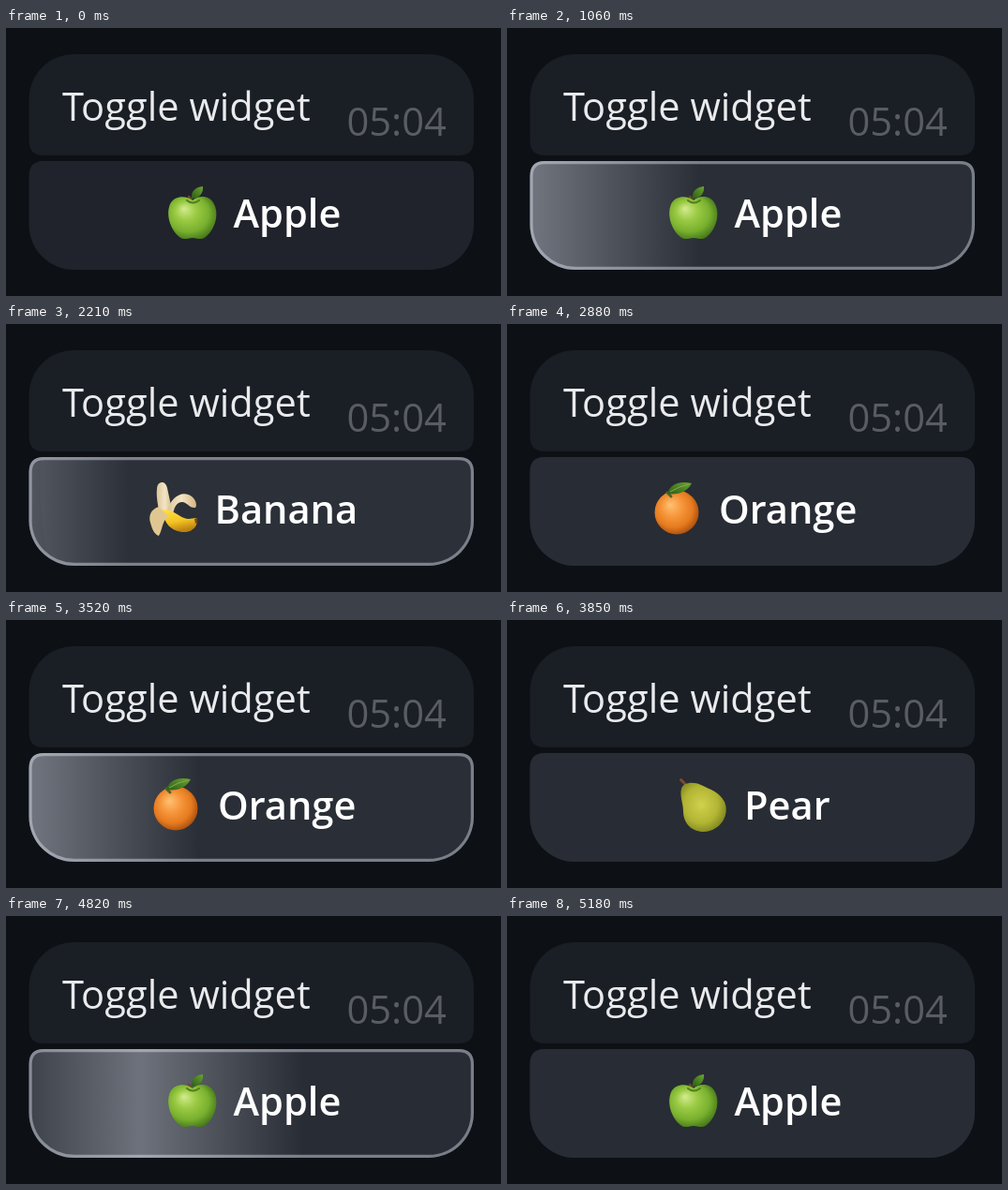
These frames come from a looping animation (528 by 286 pixels, 5210 ms). An HTML page:

```html
<!DOCTYPE html>
<html lang="en">
<head>
<meta charset="utf-8">
<title>Toggle widget</title>
<style>
  html, body { margin: 0; width: 100%; height: 100%; overflow: hidden; background: #0d1015; }
  svg { display: block; width: 528px; height: 286px; }
  text { font: 400 41.6px "Open Sans", "Noto Sans", sans-serif; fill: #e9eaec; }
  .time { fill: #595d63; }
  .label text { font-weight: 600; fill: #fff; }
  .label { display: none; }
  .label.on { display: inline; }
</style>
</head>
<body>
<svg viewBox="0 0 528 286">
  <defs>
    <path id="shape" d="M40 142H483Q499 142 499 158V210A48 48 0 0 1 451 258H73A48 48 0 0 1 24.500 210V158Q24.500 142 40 142Z"/>
    <clipPath id="clip"><use href="#shape"/></clipPath>
    <linearGradient id="shine">
      <stop offset="0" stop-color="#e8eefa" stop-opacity="0"/>
      <stop offset=".5" stop-color="#e8eefa" stop-opacity=".36"/>
      <stop offset="1" stop-color="#e8eefa" stop-opacity="0"/>
    </linearGradient>
    <radialGradient id="appleSkin" cx=".45" cy=".45" r=".62" fx=".32" fy=".28">
      <stop offset="0" stop-color="#d3ec90"/>
      <stop offset=".35" stop-color="#9ccb45"/>
      <stop offset=".7" stop-color="#78b02e"/>
      <stop offset="1" stop-color="#3f7018"/>
    </radialGradient>
    <radialGradient id="orangeSkin" cx=".46" cy=".45" r=".6" fx=".35" fy=".32">
      <stop offset="0" stop-color="#ffc274"/>
      <stop offset=".4" stop-color="#f6953a"/>
      <stop offset=".72" stop-color="#e57a1e"/>
      <stop offset="1" stop-color="#a0470d"/>
    </radialGradient>
    <radialGradient id="pearSkin" cx=".45" cy=".45" r=".62">
      <stop offset="0" stop-color="#d0d14c"/>
      <stop offset=".6" stop-color="#b2b534"/>
      <stop offset="1" stop-color="#787e1d"/>
    </radialGradient>
    <linearGradient id="bananaSkin" x1="0" y1="0" x2=".3" y2="1">
      <stop offset="0" stop-color="#ffe14a"/>
      <stop offset=".6" stop-color="#f3c324"/>
      <stop offset="1" stop-color="#bd8410"/>
    </linearGradient>
    <linearGradient id="flesh">
      <stop offset="0" stop-color="#dcc59a"/>
      <stop offset=".5" stop-color="#f3e5c4"/>
      <stop offset="1" stop-color="#d2b681"/>
    </linearGradient>
    <linearGradient id="leaf" x1="0" y1="1" x2="1" y2="0">
      <stop offset="0" stop-color="#2c5c18"/>
      <stop offset="1" stop-color="#6aa52f"/>
    </linearGradient>
  </defs>

  <path fill="#1a1e25" d="M72 28H451A48 48 0 0 1 499 76V120Q499 136 483 136H40Q24.500 136 24.500 120V76A48 48 0 0 1 72 28Z"/>
  <text x="60" y="98.500">Toggle widget</text>
  <text class="time" x="363.500" y="115">05:04</text>

  <use href="#shape" fill="#20232b"/>
  <use id="hover" href="#shape" fill="#282c34"/>
  <g clip-path="url(#clip)">
    <circle id="ripple" cx="465" cy="170" r="0" fill="#fff"/>
    <g id="loading">
      <rect id="glare" y="142" width="350" height="117" fill="url(#shine)"/>
      <use href="#shape" fill="none" stroke="#e8eefa" stroke-opacity=".42" stroke-width="6.400"/>
    </g>
  </g>

  <g class="label">
    <path fill="none" stroke="#6b4a22" stroke-width="2.500" stroke-linecap="round" d="M199 187Q198 183 195 180"/>
    <path fill="url(#appleSkin)" d="M199 184C205 178 218 178 222 188C228 200 222 216 213 223C208 227 203 224 199 224C195 224 190 227 185 223C176 216 170 200 175 188C180 178 193 179 199 184Z"/>
    <path fill="none" stroke="#4f7d20" stroke-width="2" stroke-linecap="round" d="M193 184Q199 189 206 184"/>
    <path fill="url(#leaf)" d="M198 182C197 174 202 170 210 169C211 176 206 182 198 182Z"/>
    <text x="242.500" y="213">Apple</text>
  </g>

  <g class="label">
    <path fill="url(#flesh)" d="M161 176C161 168 170 166 172 175L178 203L164 205C162 192 160 184 161 176Z"/>
    <path fill="url(#flesh)" d="M172 199C175 186 188 176 198 184C203 188 204 194 202 196C196 197 193 190 188 190C182 190 179 196 178 204Z"/>
    <path fill="url(#bananaSkin)" d="M167 198C176 197 183 204 190 207C195 209 199 207 203 207C206 214 200 222 190 222C177 222 168 213 167 198Z"/>
    <path fill="#e0c791" d="M163 195C154 198 152 205 154 212C156 220 159 225 163 226C167 220 166 211 173 205Z"/>
    <path fill="#6a4a1c" d="M201 208L204 207L204.500 212L202 213Z"/>
    <text x="222.500" y="213">Banana</text>
  </g>

  <g class="label">
    <circle cx="181" cy="201" r="23.500" fill="url(#orangeSkin)"/>
    <path fill="none" stroke="#4d6628" stroke-width="3" stroke-linecap="round" d="M175 184L171 180"/>
    <path fill="url(#leaf)" d="M171 181C174 171 184 167 197 170C192 179 183 183 171 181Z"/>
    <path fill="none" stroke="#86ab54" d="M174 179Q184 173 194 171"/>
    <text x="226" y="213">Orange</text>
  </g>

  <g class="label">
    <path fill="none" stroke="#7c4a2c" stroke-width="3" stroke-linecap="round" d="M191 178Q189 173 185.500 170.500"/>
    <path fill="url(#pearSkin)" d="M186 180C188 173 199 172 207 176C217 181 226 183 232 194C238 208 228 225 210 226C196 226 188 216 188 204C188 196 184 188 186 180Z"/>
    <text x="253" y="213">Pear</text>
  </g>
</svg>
<script>
  const LOOP = 5210;
  const PRESSES = [750, 1980, 3210, 4390];
  const RELEASE = 150, SWAP = 430, DONE = 520; // after each press
  const $ = id => document.getElementById(id);
  const labels = [...document.querySelectorAll('.label')];
  const clamp = x => Math.min(1, Math.max(0, x));
  const outQuint = x => 1 - (1 - x) ** 5;

  function draw(t) {
    $('hover').style.opacity = clamp((t - 580) / 150);

    const swaps = PRESSES.filter(p => t >= p + SWAP).length;
    labels.forEach((el, i) => el.classList.toggle('on', i === swaps % labels.length));

    const press = PRESSES.filter(p => t >= p).pop();
    const age = press === undefined ? Infinity : t - press;
    const held = age - RELEASE;

    $('ripple').setAttribute('r', 450 * outQuint(clamp((age + 66) / 650)));
    $('ripple').style.opacity = 0.035 * clamp(1 - held / 200);

    const busy = held >= 0 && age < DONE;
    const fade = Math.min(clamp(held / 60), clamp((DONE - age) / (DONE - SWAP)));
    $('loading').style.opacity = busy ? fade : 0;
    $('glare').setAttribute('x', busy ? -295 + 0.94 * held : -400);
  }

  let start;
  function tick(now) {
    start ??= now;
    draw((now - start) % LOOP);
    requestAnimationFrame(tick);
  }
  draw(0);
  requestAnimationFrame(tick);
</script>
</body>
</html>
```
